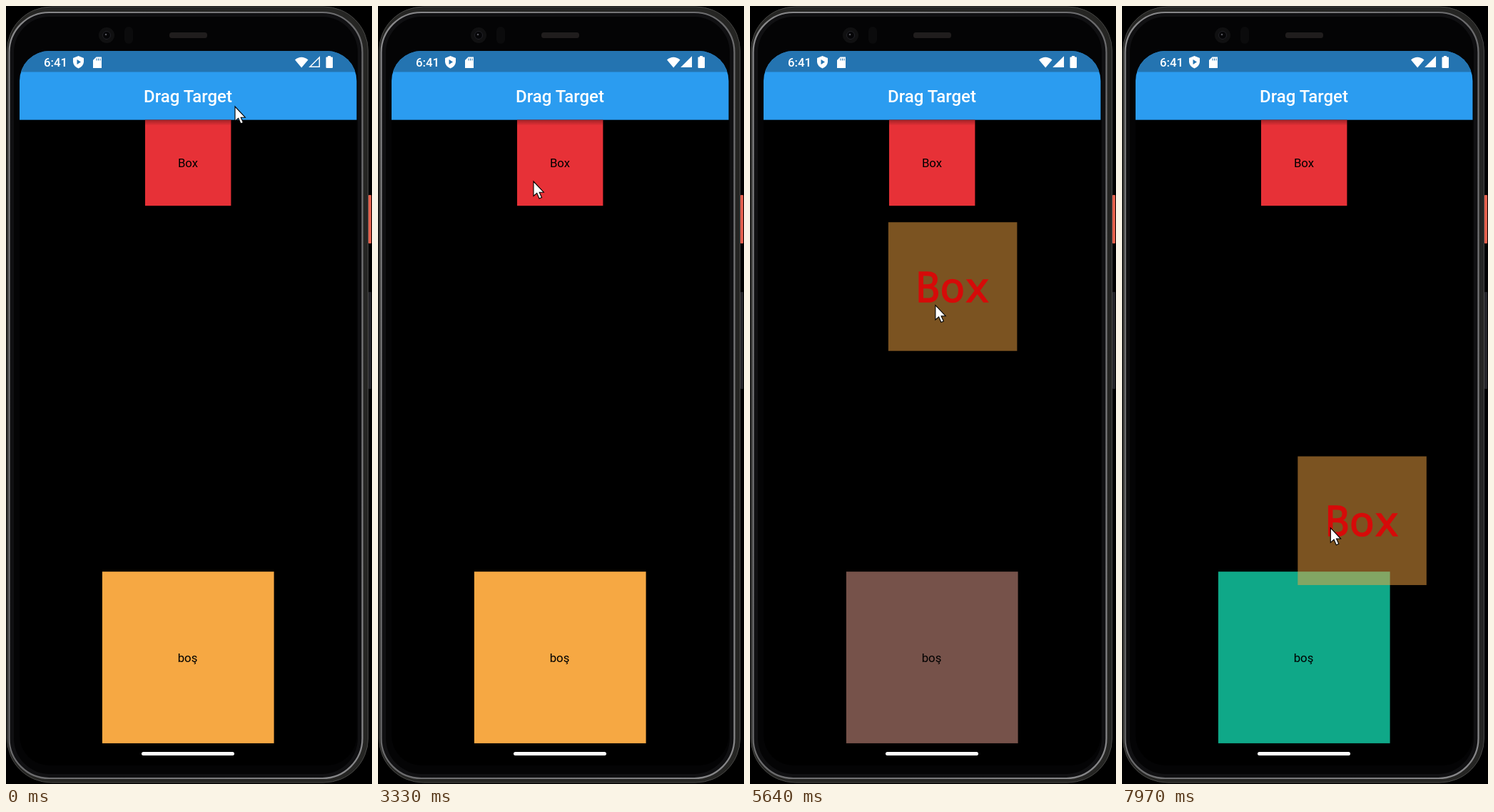
Animation of 513x1091 px, one loop 8000 ms. Source, as an HTML page:

```html
<!DOCTYPE html>
<html lang="en">
<head>
<meta charset="utf-8">
<title>Drag Target</title>
<style>
  html, body { margin: 0; width: 100%; height: 100%; overflow: hidden; background: #000; }
  svg { display: block; width: 513px; height: 1091px; }
  text { font: 16.8px Roboto, sans-serif; text-anchor: middle; }
  .title { font-size: 24px; font-weight: 500; fill: #fff; }
  .clock { font-weight: 500; fill: #fff; text-anchor: start; }
  .big { font: 57.8px "Noto Sans Mono", monospace; fill: #e40006; stroke: #e40006; stroke-width: 1.6; opacity: .87; }
</style>
</head>
<body>
<svg viewBox="0 0 513 1091">
  <defs>
    <linearGradient id="rim" x2="1" y2="1">
      <stop offset="0" stop-color="#8a8a8c"/>
      <stop offset=".5" stop-color="#6a6a6c"/>
      <stop offset="1" stop-color="#88888a"/>
    </linearGradient>
    <linearGradient id="shade" x2="0" y2="1">
      <stop offset="0" stop-opacity=".3"/>
      <stop offset="1" stop-opacity="0"/>
    </linearGradient>
    <clipPath id="screen"><rect x="19" y="63" width="472.5" height="1002" rx="42"/></clipPath>
  </defs>

  <!-- phone body -->
  <rect x="508" y="265" width="4" height="68" rx="1" fill="#e5604c"/>
  <rect x="508" y="401" width="4" height="136" rx="1" fill="#25252a"/>
  <rect x="1.5" y="1" width="506" height="1088" rx="62" fill="#252523" stroke="#484846"/>
  <rect x="4.5" y="9" width="495" height="1074" rx="56" fill="#101012" stroke="url(#rim)" stroke-width="2.2"/>
  <rect x="11" y="15" width="482" height="1062" rx="50" fill="#040405"/>
  <circle cx="141" cy="41" r="11" fill="#101011"/>
  <circle cx="141" cy="41" r="5.5" fill="#050507" stroke="#222227"/>
  <circle cx="140" cy="40" r="1.3" fill="#55555d"/>
  <rect x="166" y="29" width="12" height="24" rx="6" fill="#0b0b0c"/>
  <rect x="229" y="37" width="53" height="8" rx="3.5" fill="#201d1d"/>

  <!-- app -->
  <g clip-path="url(#screen)">
    <rect width="513" height="1091"/>
    <rect width="513" height="159.7" fill="#2b9cf0"/>
    <rect width="513" height="92.5" fill="#2474b1"/>
  </g>
  <text class="clock" x="53" y="85">6:41</text>
  <g fill="#fff">
    <path d="M101.5 70L109 73V78.500Q108.500 84.500 101.500 87.500Q94.500 84.500 94 78.500V73Z"/>
    <path d="M99.500 75V82L105 78.500Z" fill="#2474b1"/>
    <path d="M126.500 71.500H134V87H122V76Z"/>
    <path d="M126.500 75H133" stroke="#2474b1" stroke-width="3" stroke-dasharray="1 1.500"/>
    <path d="M405 75.500Q414 68 423.500 75.500L414.200 86.500Z"/>
    <path id="signal" d="M439.300 72V85.300H426Z" stroke="#fff" stroke-width="1.500"/>
    <rect x="448.500" y="71.500" width="9.500" height="15.500" rx="1"/>
    <rect x="451" y="70" width="4" height="2"/>
  </g>
  <text class="title" x="255" y="135">Drag Target</text>
  <rect x="195" y="159.700" width="120.400" height="120.400" fill="#e73137"/>
  <rect x="195" y="159.700" width="120.400" height="8" fill="url(#shade)"/>
  <text x="255" y="226">Box</text>
  <rect id="target" x="134.900" y="793.200" width="240.700" height="240.700"/>
  <text x="254.500" y="920">boş</text>
  <rect x="190" y="1046" width="130" height="5" rx="2.500" fill="#fff"/>

  <g id="drag">
    <rect width="180.500" height="180.500" fill="#f6a642" fill-opacity=".5"/>
    <text class="big" x="90" y="111.500">Box</text>
  </g>
  <path id="cursor" d="M0 0V20.500L4.700 16.400L8 24L11.500 22.500L8.200 15.200H14.300Z" fill="#fff" stroke="#000" stroke-width="1.100"/>
</svg>
<script>
const LOOP = 8000;
const $ = id => document.getElementById(id);
const place = (el, x, y) => el.setAttribute("transform", `translate(${x} ${y})`);
const colors = ["#f6a843", "#76524a", "#0fa888"];  // after each drop

// the hand rests briefly at each stop and eases to the next
const stops = [
  { t: 0, x: 320, y: 142 },
  { t: 1300, x: 140, y: 532 },
  { t: 2200, x: 140, y: 532 },
  { t: 3330, x: 217, y: 247 },
  { t: 3480, x: 225, y: 236, act: "grab" },
  { t: 4380, x: 210, y: 927 },
  { t: 4600, x: 210, y: 927, act: "drop" },
  { t: 5380, x: 260, y: 277, act: "grab" },
  { t: 6230, x: 255, y: 915 },
  { t: 6350, x: 288, y: 905, act: "drop" },
  { t: 7340, x: 240, y: 261, act: "grab" },
  { t: 8260, x: 307, y: 877 }
];

function draw(now) {
  const t = Math.max(0, now) % LOOP;
  const past = stops.filter(s => s.t <= t);
  const from = past.at(-1), to = stops[past.length];
  const u = (t - from.t) / (to.t - from.t), ease = u * u * (3 - 2 * u);
  const x = from.x + (to.x - from.x) * ease;
  const y = from.y + (to.y - from.y) * ease;

  const last = past.findLast(s => s.act);
  const held = last?.act === "grab";
  const drops = past.filter(s => s.act === "drop").length;
  const over = held && y > 793;

  place($("cursor"), x + 1, y - 1);
  $("drag").style.display = held ? "" : "none";
  if (held) place($("drag"), 195 + x - last.x, 159.7 + y - last.y);
  $("target").setAttribute("fill", over ? "#ebebeb" : colors[drops]);
  $("signal").setAttribute("fill", t < 600 ? "none" : "#fff");
  requestAnimationFrame(draw);
}
draw(0);
</script>
</body>
</html>
```
